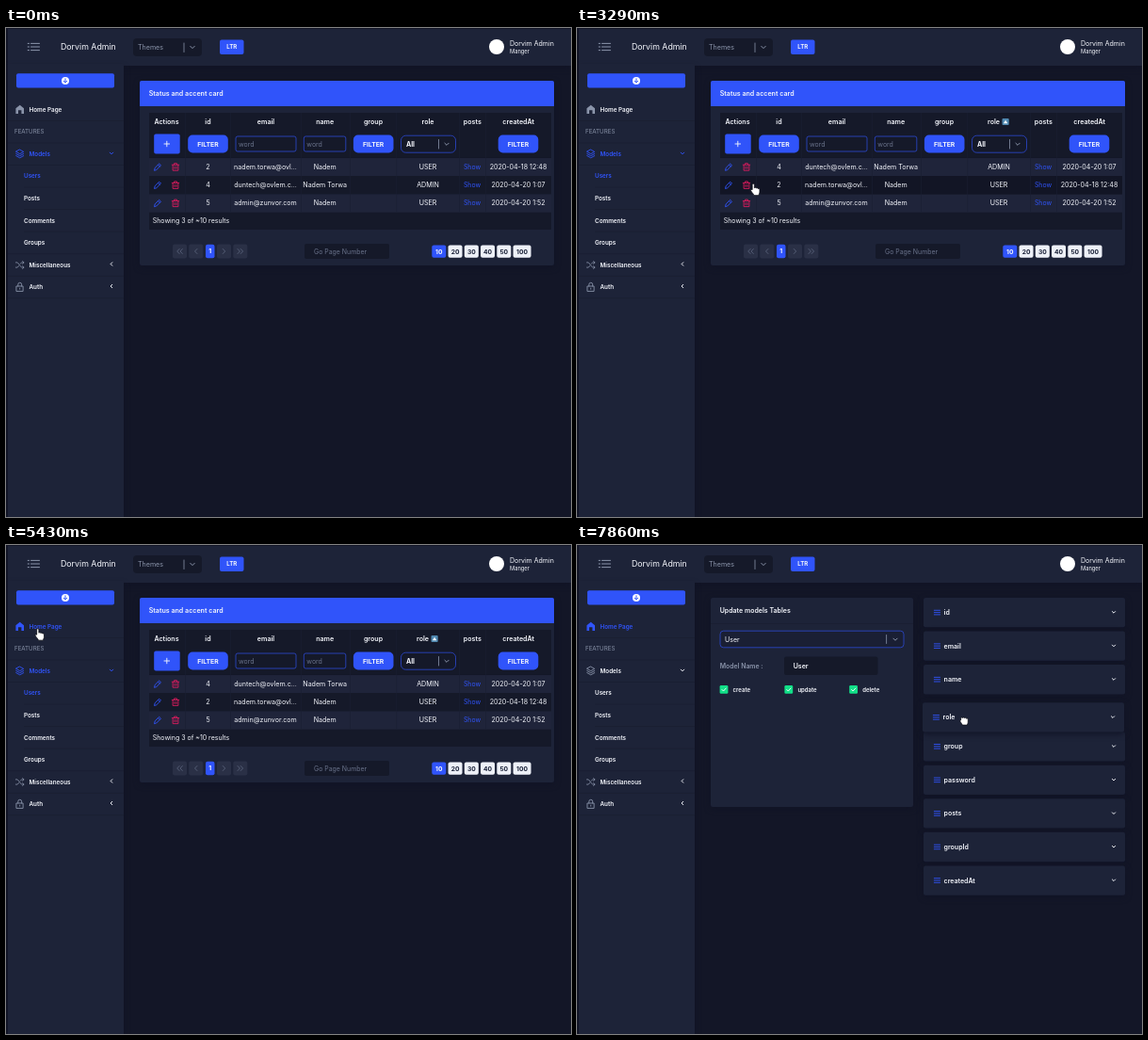
Write an HTML page that moves like this. It is 600 px wide and 519 px high and loops after 8000 ms.

```html
<!DOCTYPE html>
<html lang="en">
<head>
<meta charset="utf-8">
<title>Admin panel</title>
<style>
html, body { margin: 0; width: 100%; height: 100%; overflow: hidden; background: #131627; }
svg { display: block; width: 600px; height: 519px; font-family: Inter, Roboto, sans-serif; }
.shade { filter: drop-shadow(0 2px 3px #101325); }
</style>
</head>
<body>
<svg id="stage" viewBox="0 0 600 519" xmlns="http://www.w3.org/2000/svg"></svg>
<script>
const LOOP = 8000, STEP = 1000 / 7;
const BODY = '#131627', CARD = '#1d2338', DARK = '#151929', LINE = '#191e31',
  BLUE = '#3054fa', WHITE = '#f4f6fc', GREY = '#8a94aa', DIM = '#69728a', PINK = '#dc1c5e', GREEN = '#12df88';

const rect = (x, y, w, h, fill, r = 0, extra = '') =>
  `<rect x="${x}" y="${y}" width="${w}" height="${h}" rx="${r}" fill="${fill}" ${extra}/>`;

// y is the middle of the line of text
const text = (x, y, s, size = 7.1, fill = WHITE, weight = 400, anchor = 'start', extra = '') =>
  `<text x="${x}" y="${y + size * 0.36}" font-size="${size}" fill="${fill}" font-weight="${weight}" text-anchor="${anchor}" ${extra}>${s}</text>`;

const mid = (x, y, s, size, fill, weight) => text(x, y, s, size, fill, weight, 'middle');

const path = (d, color, width = 1, extra = '') =>
  `<path d="${d}" fill="none" stroke="${color}" stroke-width="${width}" stroke-linecap="round" stroke-linejoin="round" ${extra}/>`;

const group = (s, attrs = '') => `<g ${attrs}>${s}</g>`;
const icon = (x, y, s, attrs = '') => group(s, `transform="translate(${x} ${y})" ${attrs}`);
const down = (x, y, color = WHITE, s = 1.8) =>
  path(`M${x - s} ${y - s / 2}l${s} ${s}l${s} ${-s}`, color);
const left = (x, y) => path(`M${x + 0.8} ${y - 1.7}l-1.7 1.7l1.7 1.7`, WHITE);
const outline = 'stroke="#2c4ad2" stroke-width=".8"';

function header() {
  return group(rect(2, 1, 598, 39, CARD), 'class="shade"') +
    path('M26.5 16.4H35.5M26.5 20H35.5M26.5 23.6H35.5M23.2 16.4H24.5M23.2 20H24.5M23.2 23.6H24.5', GREY, 1) +
    text(58, 20.2, 'Dorvim Admin', 8.8) +
    rect(135, 11, 73, 19, DARK, 4) + text(140, 20.5, 'Themes', 7.1, GREY) +
    path('M189 16V25.5', GREY, 0.8) + down(198, 20.5, GREY, 2.2) +
    rect(227, 12.5, 25.5, 15.5, BLUE, 2) + mid(239.8, 20.3, 'LTR', 6.1, WHITE, 700) +
    '<circle cx="521" cy="20" r="8" fill="#fff"/>' +
    text(535, 16.7, 'Dorvim Admin', 7) + text(535, 25, 'Manger', 5.75);
}

function sidebar() {
  let s = group(rect(2, 40, 123, 479, CARD), 'class="shade"') + rect(2, 38, 123, 3, CARD) +
    rect(11, 48.3, 104, 15.2, BLUE, 2) +
    '<circle cx="63" cy="55.9" r="4" fill="#fff"/>' + path('M63 53.8V57.7M61.3 56.2L63 57.9L64.7 56.2', BLUE, 1);
  for (let i = 0; i < 9; i++) {
    const x = i > 2 && i < 6 ? 19 : 2;
    s += rect(x, 98 + i * 23.55, 125 - x, 0.8, LINE);
  }
  const home = '<path d="M-4.3 4.6V-1.2L0 -4.8L4.3 -1.2V4.6H1.7V.8H-1.7V4.6Z" fill="currentColor"/>';
  const layers = path('M0 -4.3L4 -2.1L0 .1L-4 -2.1ZM-4 0L0 2.2L4 0M-4 2.1L0 4.3L4 2.1', 'currentColor', 0.9);
  const shuffle = path('M-4.3 -2.6H-2.5L1.8 2.6H4.2M-4.3 2.6H-2.5L-1.2 1M.6 -1.2L1.8 -2.6H4.2M2.9 -4L4.3 -2.6L2.9 -1.2M2.9 1.2L4.3 2.6L2.9 4', GREY, 0.8);
  const lock = path('M-3.4 -1H3.4V4.4H-3.4ZM-1.9 -1V-2.8A1.9 1.9 0 0 1 1.9 -2.8V-1M0 1.1V2.2', GREY, 0.9);
  s += icon(14.7, 86.5, home, 'id="homeIcon"') +
    group(text(24.5, 86.5, 'Home Page', 6.3, 'currentColor', 600), 'id="homeText"');
  s += text(9, 110, 'FEATURES', 6.2, GREY);
  s += icon(14.7, 133.5, layers, 'id="modelIcon"') +
    group(text(24.5, 133.5, 'Models', 6.3, 'currentColor', 600) + down(112, 133, 'currentColor', 1.7), 'id="modelText"');
  s += group(text(19, 157, 'Users', 6.3, 'currentColor', 600), 'id="users"');
  ['Posts', 'Comments', 'Groups'].forEach((n, i) => s += text(19, 180.8 + i * 23.6, n, 6.3, WHITE, 600));
  s += icon(14.7, 251.5, shuffle) + text(24.5, 251.5, 'Miscellaneous', 6.3, WHITE, 600) + left(112, 250.5);
  s += icon(14.7, 275, lock) + text(24.5, 275, 'Auth', 6.3, WHITE, 600) + left(112, 274);
  return s;
}

const sortMark = (x, fill) => rect(x, 96, 7.2, 7, fill, 1) + `<path d="M${x + 1.4} 101.2h4.4l-2.2 -3.4z" fill="#fff"/>`;
const filter = x => rect(x - 21.3, 113.5, 42.6, 19, BLUE, 5) + mid(x, 123.2, 'FILTER', 6.8, WHITE, 700);

function row(id, mail, name, role, date, n) {
  const y = 147.5;
  return group(mid(214.5, y, id) + mid(275.5, y, mail) + mid(338.7, y, name) +
    mid(448, y, role) + mid(544, y, date), `id="row${n}"`);
}

function tablePage() {
  let s = group(rect(142, 56, 440, 196, CARD, 2), 'class="shade"') +
    `<path d="M142 83V58a2 2 0 0 1 2 -2H580a2 2 0 0 1 2 2V83Z" fill="${BLUE}"/>` +
    text(151.7, 69.6, 'Status and accent card', 7.1, WHITE, 600) +
    rect(152, 90, 427, 124, DARK) +
    rect(152, 138, 427, 19, '#1f243a') + rect(152, 176.4, 427, 18.8, '#1f243a') +
    rect(152, 157, 427, 19.4, '#121525', 0, 'id="hoverRow"') +
    rect(152, 137.4, 427, 0.7, BODY) + rect(152, 195, 427, 0.7, CARD);
  for (const x of [190, 238, 313, 365, 414.5, 481, 509]) s += rect(x, 90, 0.6, 105, '#1a1f32');
  const heads = [[170.5, 'Actions'], [214.5, 'id'], [276, 'email'], [338.7, 'name'], [495.3, 'posts'], [544.2, 'createdAt']];
  for (const [x, n] of heads) s += mid(x, 99.7, n, 7.1, WHITE, 600);
  s += rect(374, 95, 22, 9.5, '#537397', 0, 'id="select"') +
    group(mid(390, 99.7, 'group', 7.1, WHITE, 600), 'id="headGroup"') +
    group(sortMark(397.2, '#8ba5bd'), 'id="sortGroup"') +
    group(mid(448, 99.7, 'role', 7.1, WHITE, 600), 'id="headRole"') +
    group(sortMark(451.5, '#5088b0'), 'id="sortRole"');
  s += rect(157.2, 112.5, 27.5, 21, BLUE, 2, 'id="add"') + path('M168 123H173.6M170.8 120.2V125.8', WHITE, 0.9);
  s += filter(214.5) + filter(390.2) + filter(544);
  for (const [x, w] of [[244, 64], [316.3, 44.5]])
    s += rect(x, 115, w, 16, DARK, 2, outline) + text(x + 3, 123.2, 'word', 7, DIM);
  s += rect(419.5, 114.2, 58, 18, DARK, 5, outline) + text(425, 123.3, 'All', 7, WHITE, 700) +
    path('M459.5 118.5V128', GREY, 0.8) + down(468, 123.3, GREY, 2.1);
  const pencil = path('M-3.4 3.4L-2.8 .9L1.7 -3.5L3.5 -1.7L-1 2.8ZM.5 -2.3L2.3 -.5', BLUE, 0.9);
  const bin = path('M-3.7 -2.3H3.7M-1.4 -2.5V-3.8H1.4V-2.5M-2.9 -2.2V3.7H2.9V-2.2M-1 -.3V1.8M1 -.3V1.8', PINK, 0.9);
  for (let i = 0; i < 3; i++) {
    const y = 147.5 + i * 19.2;
    s += icon(161, y, pencil) + icon(180, y, bin) + mid(495, y, 'Show', 6.9, BLUE);
  }
  s += row(2, 'nadem.torwa@ovl...', 'Nadem', 'USER', '2020-04-18 12:48', 0) +
    row(4, 'duntech@ovlem.c...', 'Nadem Torwa', 'ADMIN', '2020-04-20 1:07', 1) +
    row(5, 'admin@zunvor.com', 'Nadem', 'USER', '2020-04-20 1:52', 2);
  s += text(155.7, 204.8, 'Showing 3 of ~10 results', 7);

  const chevrons = (x, dir, n) => {
    let d = '';
    for (let i = 0; i < n; i++) d += `M${x + dir * 1.2 + (i - (n - 1) / 2) * 3.2} 234.5l${-dir * 2.4} 2.5l${dir * 2.4} 2.5`;
    return path(d, '#59617a', 0.9);
  };
  for (const [x, dir, n] of [[177, 1, 2], [194.2, 1, 1], [224, -1, 1], [241.3, -1, 2]])
    s += rect(x, 229.5, 15, 15, '#2a3046', 2) + chevrons(x + 7.5, dir, n);
  s += rect(212, 229.8, 9.5, 14.5, BLUE, 2) + mid(216.7, 237, '1', 6.8, WHITE, 700);
  s += rect(317, 229, 90, 16, DARK, 2) + text(327, 237, 'Go Page Number', 6.95, DIM);
  [10, 20, 30, 40, 50, 100].forEach((n, i) => {
    const x = 452.3 + i * 17.25, w = n > 99 ? 19 : 15, on = !i;
    s += rect(x, 230.5, w, 13.2, on ? BLUE : '#edf0f7', 2) + mid(x + w / 2, 237.2, n, 6.7, on ? WHITE : '#1a2138', 700);
  });
  return s;
}

const FIELDS = ['id', 'email', 'name', 'group', 'password', 'role', 'posts', 'groupId', 'createdAt'];
const PITCH = 35.55;

function homePage() {
  let s = group(rect(142, 56, 215, 222, CARD, 2), 'class="shade"') +
    text(151.7, 69.7, 'Update models Tables', 7, WHITE, 600) + rect(142, 83, 215, 0.8, LINE) +
    rect(152, 91.2, 195, 17.6, '#1a1f34', 3.5, outline) + text(157, 100.2, 'User', 7) +
    path('M328.6 95.5V104.5', GREY, 0.8) + down(338, 100.2, GREY, 2.1) +
    text(151.7, 128.6, 'Model Name :', 6.9, GREY, 600) +
    rect(220, 118.5, 99.5, 19.5, DARK, 2) + text(229.7, 128.6, 'User', 7, WHITE, 600);
  ['create', 'update', 'delete'].forEach((n, i) => {
    const x = 151.6 + i * 68.8;
    s += rect(x, 149, 8.8, 8.8, GREEN, 1.3) + path(`M${x + 2.4} 153.5l1.5 1.5l2.7 -3`, '#fff', 0.9) +
      text(x + 14, 153.5, n, 6, WHITE, 600);
  });
  const card = n => group(
    group(rect(368, 56, 214, 31.3, CARD, 2), 'class="shade"') +
    path('M379.3 69.3H385.5M379.3 71.6H385.5M379.3 73.9H385.5', BLUE, 0.9) +
    text(389.6, 71.6, n, 7, WHITE, 600) + down(570, 71.4, WHITE, 1.6), `id="field-${n}"`);
  s += FIELDS.filter(n => n !== 'role').map(card).join('') + card('role');
  return s;
}

function cursor() {
  const shape = (d, id) => `<path id="${id}" d="${d}" transform="scale(1.12)" fill="#fff" stroke="#0a0b14" stroke-width=".7" stroke-linejoin="round"/>`;
  return group(
    shape('M-3 -4.6c0-1.4 2-1.4 2 0v3.1c.4-.8 1.7-.6 1.8.2.5-.6 1.6-.4 1.7.5.6-.4 1.5 0 1.5.9v2.2c0 1.4-.8 1.6-.8 3.2h-4.6c-.3-1.5-1.9-2.5-2.9-4.4-.5-1 .5-1.6 1.3-.9z', 'hand') +
    shape('M-3 -2.4c.3-1 1.6-1 1.8-.2.3-.9 1.6-.8 1.8.1.5-.6 1.6-.4 1.7.5.7-.4 1.5.1 1.5.9v2.6c0 1.2-.7 1.4-.7 2.6h-4.6c-.3-1.2-1.5-1.8-2-3.2-.4-1.2.1-1.8.5-1.4z', 'fist'),
    'id="cursor"');
}

const $ = id => document.getElementById(id);
$('stage').innerHTML = rect(0, 0, 600, 519, BODY) + group(tablePage(), 'id="table"') + group(homePage(), 'id="home"') +
  header() + sidebar() + cursor();

const show = (id, on) => $(id).setAttribute('visibility', on ? 'inherit' : 'hidden');
const move = (id, x, y) => $(id).setAttribute('transform', `translate(${x} ${y})`);
const tint = (id, on, off = WHITE) => $(id).setAttribute('color', on ? BLUE : off);
const ease = p => { p = Math.min(1, Math.max(0, p)); return p * p * (3 - 2 * p); };

// time, x, y
const TRACK = [
  [140, 300, 190], [430, 372, 128], [714, 386, 106], [1280, 386, 104], [1571, 444, 107], [2290, 444, 106],
  [3285, 189.5, 171.5], [3430, 189.5, 171.5], [4142, 169, 128], [4429, 169, 128], [4857, 36, 94], [5428, 36, 95],
  [6142, 38, 94], [7142, 412, 253], [7300, 412, 253], [7857, 411, 186.5]
];

function pointer(t) {
  let i = 0;
  while (i < TRACK.length - 2 && t >= TRACK[i + 1][0]) i++;
  const [t0, x0, y0] = TRACK[i], [t1, x1, y1] = TRACK[i + 1];
  const p = ease((t - t0) / (t1 - t0));
  return [x0 + (x1 - x0) * p, y0 + (y1 - y0) * p];
}

function draw(time) {
  const t = Math.floor((time + 5) / STEP) * STEP;
  const [x, y] = pointer(t);
  const onHome = t >= 5850, hovered = t >= 5140, dragging = t >= 7420;
  const grouped = t >= 990 && t < 1700, sorted = t >= 1700;

  show('table', !onHome);
  show('home', onHome);
  tint('homeIcon', hovered, GREY);
  tint('homeText', hovered);
  tint('modelIcon', !onHome, GREY);
  tint('modelText', !onHome);
  tint('users', !onHome);

  for (const id of ['select', 'sortGroup']) show(id, grouped && !onHome);
  show('sortRole', sorted && !onHome);
  move('headGroup', grouped ? -5 : 0, 0);
  move('headRole', sorted ? -5.5 : 0, 0);
  [sorted ? 1 : 0, sorted ? 0 : 1, 2].forEach((slot, i) => move('row' + i, 0, slot * 19.2));
  show('hoverRow', !onHome && t > 140 && x > 152 && x < 579 && y - 5 > 157 && y - 5 < 176);
  $('add').setAttribute('fill', x > 157 && x < 185 && y - 5 > 112 && y - 5 < 133 ? '#4364fb' : BLUE);

  FIELDS.forEach((n, i) => {
    let dx = 0, dy = i * PITCH;
    if (dragging && n === 'role') { dx = x - 412; dy += y - 253; }
    if (n === 'password') dy += PITCH * ease((t - 7480) / 180);
    if (n === 'group') dy += PITCH * ease((t - 7640) / 210);
    move('field-' + n, dx, dy);
  });

  move('cursor', x, y);
  show('hand', t > 130 && !dragging);
  show('fist', dragging);
}

function tick() {
  draw(performance.now() % LOOP);
  requestAnimationFrame(tick);
}
tick();
</script>
</body>
</html>
```
